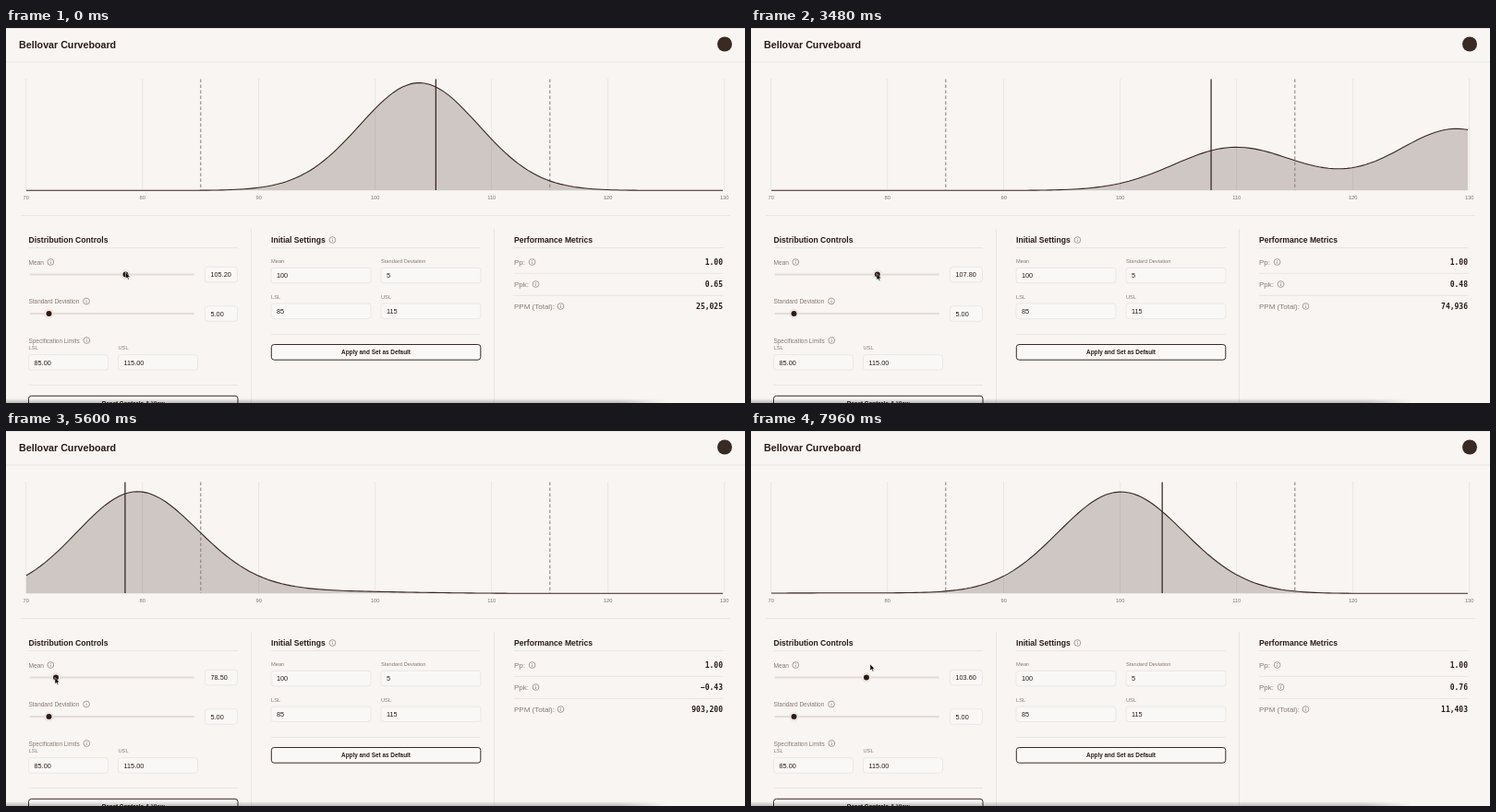
These frames come from a looping animation (800 px wide and 407 px high, 8000 ms). An HTML page:

```html
<!DOCTYPE html>
<html lang="en">
<head>
<meta charset="utf-8">
<title>Bellovar Curveboard</title>
<style>
  html, body { margin: 0; width: 100%; height: 100%; overflow: hidden; background: #f8f5f3; }
  svg { display: block; width: 100vw; height: 100vh; }
  text { font-family: "Liberation Sans", Arial, sans-serif; fill: #2a1a15; }
  .bold { font-weight: bold; }
  .muted { fill: #89796f; }
  .tick { fill: #7d746f; }
  .metric { font-family: "DejaVu Sans Mono", monospace; font-weight: bold; }
  .rule { stroke: #e9e5e2; }
  .grid { stroke: #eae6e3; }
  .limit { stroke: #867b76; stroke-dasharray: 3.5 2.5; }
  .field { fill: #faf8f6; stroke: #ebe7e4; }
  .button { fill: #faf8f6; stroke: #3a2a24; }
  .info { fill: none; stroke: #89796f; stroke-width: .7; }
</style>
</head>
<body>
<svg id="stage" viewBox="0 0 800 407" preserveAspectRatio="none"></svg>
<script>
const LOOP = 8000, STEP = 40;
const LSL = 85, USL = 115, SIGMA = 5;
const BASE = 176.3, PEAK = 119.3;
const LEFT = 22, RIGHT = 776, SCALE = 12.6;

// time, mean, pointer offset from the knob, pointer y
const KEYS = [
  [-400, 102.3, 0, 265], [0, 105.2, 0, 265], [500, 112.5, 0, 265], [840, 114.3, 0, 265],
  [1100, 115.7, 0, 265], [1200, 116.5, 0, 265], [1320, 119.5, 0, 264.5], [1680, 122.8, 0, 264],
  [1800, 129, 0, 264], [2200, 129.1, 0, 264], [3320, 129.1, 0, 265], [3360, 112, -.5, 266],
  [3600, 103.5, -1, 267], [4200, 101.2, -1, 268], [4360, 98.9, -1, 268.5], [4700, 88, -1, 268],
  [5000, 83, -1, 267.5], [5200, 80, -1, 267.5], [5600, 78.5, -1, 267.5], [6000, 73, 1, 266],
  [6350, 73.5, 3, 265], [6520, 77.4, 3.5, 265], [6800, 97, 4, 262], [7500, 98, 4, 257],
  [7800, 99.5, 4, 255], [7960, 103.6, 4, 253]
];

const chartX = value => LEFT + (value - 70) * SCALE;
const knobX = mean => 54 + (mean - 78.5) * 2.826;

function keyed(t, column) {
  if (t <= KEYS[0][0]) return KEYS[0][column];
  const next = KEYS.findIndex(key => key[0] >= t);
  if (next < 0) return KEYS[KEYS.length - 1][column];
  const a = KEYS[next - 1], b = KEYS[next];
  return a[column] + (b[column] - a[column]) * (t - a[0]) / (b[0] - a[0]);
}

const meanAt = t => Math.round(keyed(t, 1) * 10) / 10;

// Upper tail of the standard normal distribution, by its power series
function upperTail(z) {
  let term = z, sum = z;
  for (let n = 3; n < 400; n += 2) sum += term *= z * z / n;
  return .5 - sum * Math.exp(-z * z / 2) / Math.sqrt(2 * Math.PI);
}

// The curve trails the mean: every height eases exponentially to its new value.
function curvePath(t) {
  const lag = 260, dt = 10, segments = 150, history = [];
  let total = 0;
  for (let age = 0; age < 2000; age += dt) {
    const weight = Math.exp(-age / lag);
    history.push([meanAt(t - age), weight]);
    total += weight;
  }
  const points = [];
  for (let i = 0; i <= segments; i++) {
    const x = LEFT + (RIGHT - LEFT) * i / segments;
    const value = 70 + (x - LEFT) / SCALE;
    let height = 0;
    for (const [mean, weight] of history) {
      const z = (value - mean) / SIGMA;
      height += weight * Math.exp(-z * z / 2);
    }
    points.push(x.toFixed(1) + ' ' + (BASE - PEAK * height / total).toFixed(2));
  }
  return 'M' + points.join('L');
}

const text = (x, y, size, content, cls = '', extra = '') =>
  `<text x="${x}" y="${y}" font-size="${size}" class="${cls}" ${extra}>${content}</text>`;
const line = (x1, y1, x2, y2, cls = 'rule') =>
  `<line x1="${x1}" y1="${y1}" x2="${x2}" y2="${y2}" class="${cls}"/>`;
const box = (x, y, w, h, cls = 'field') =>
  `<rect x="${x}" y="${y}" width="${w}" height="${h}" rx="3" class="${cls}"/>`;
const info = (x, y) =>
  `<path class="info" d="M${x - 3.4} ${y}a3.4 3.4 0 1 0 6.8 0a3.4 3.4 0 1 0 -6.8 0M${x} ${y - .4}v2.2M${x} ${y - 1.9}v.8"/>`;
const field = (x, y, w, content, id = '') =>
  box(x, y, w, 16.5) + text(x + 6, y + 10.8, 7.3, content, '', id && `id="${id}"`);
const button = (x, y, label) =>
  box(x, y, 226.5, 16.7, 'button') + text(x + 113.2, y + 10.5, 6.4, label, 'bold', 'text-anchor="middle"');
const heading = (x, label) =>
  text(x, 233, 8.6, label, 'bold') + line(x, 238.5, x + 226.5, 238.5);
const track = y => `<rect x="25.5" y="${y - 1}" width="178.5" height="2" rx="1" fill="#e5dbd5"/>`;
const knob = (x, y, id) =>
  `<g id="${id}" transform="translate(${x} ${y})"><circle r="4.7" fill="#f8f1ed" stroke="#e5d8d1" stroke-width=".8"/><circle r="3" fill="#2a1a15"/></g>`;
const metric = (y, label, iconX, id, content = '') =>
  text(550, y, 8, label, 'muted') + info(iconX, y - 3) +
  text(776, y, 8, content, 'metric', `id="${id}" text-anchor="end"`);

const ticks = [70, 80, 90, 100, 110, 120, 130];

document.getElementById('stage').innerHTML = `
  <defs>
    <linearGradient id="shade" x1="0" y1="0" x2="0" y2="1">
      <stop offset="0" stop-color="#000" stop-opacity="0"/>
      <stop offset="1" stop-color="#000" stop-opacity=".24"/>
    </linearGradient>
    <linearGradient id="fade">
      <stop offset=".93" stop-color="#fff"/><stop offset="1" stop-color="#000"/>
    </linearGradient>
    <mask id="shadeMask"><rect y="400" width="715" height="7" fill="url(#fade)"/></mask>
  </defs>
  <rect width="800" height="407" fill="#f8f5f3"/>
  ${line(0, .5, 800, .5)}
  ${text(14, 21.7, 10.7, 'Bellovar Curveboard', 'bold')}
  <circle cx="778" cy="17.5" r="8" fill="#3a2a24"/>
  ${line(0, 37, 800, 37)}

  ${ticks.map(v => line(chartX(v) - .3, 55, chartX(v) - .3, 176, 'grid') +
    text(chartX(v) - .3, 186, 5.7, v, 'tick', 'text-anchor="middle"')).join('')}
  <path id="area" fill="#36200f" fill-opacity=".21"/>
  ${[LSL, USL].map(v => line(chartX(v) - .2, 55.5, chartX(v) - .2, 176, 'limit')).join('')}
  <path id="curve" fill="none" stroke="#3a2620" stroke-width="1.1"/>
  <line id="meanLine" y1="55.5" y2="176" stroke="#2f1f1a" stroke-width="1.2"/>
  ${line(16, 203.5, 784, 203.5)}
  ${line(265.5, 218, 265.5, 407)}${line(528.5, 218, 528.5, 407)}

  ${heading(24.5, 'Distribution Controls')}
  ${text(24.5, 256.5, 6.6, 'Mean', 'muted')}${info(48.3, 254)}
  ${track(267.5)}${field(215.5, 259.3, 35, '', 'meanValue')}
  ${text(24.5, 299, 6.45, 'Standard Deviation', 'muted')}${info(87, 296.5)}
  ${track(310)}${field(215.5, 301.8, 35, '5.00')}
  ${knob(46.5, 310, 'sdKnob')}
  ${text(24.5, 341.7, 6.45, 'Specification Limits', 'muted')}${info(87.3, 339)}
  ${text(24.5, 349, 5.7, 'LSL', 'muted')}${text(121.5, 349, 5.7, 'USL', 'muted')}
  ${field(24.5, 354.7, 86, '85.00')}${field(121.5, 354.7, 86, '115.00')}
  ${line(24.5, 387.5, 251, 387.5)}
  ${button(24.5, 399.3, 'Reset Controls &amp; View')}

  ${heading(287, 'Initial Settings')}${info(353.4, 230)}
  ${text(287, 255, 5.7, 'Mean', 'muted')}${text(406, 255, 5.7, 'Standard Deviation', 'muted')}
  ${field(287, 260.3, 108, '100')}${field(406, 260.3, 108, '5')}
  ${text(287, 293.7, 5.7, 'LSL', 'muted')}${text(406, 293.7, 5.7, 'USL', 'muted')}
  ${field(287, 299, 108, '85')}${field(406, 299, 108, '115')}
  ${line(287, 332.5, 513.5, 332.5)}
  ${button(287.3, 343.5, 'Apply and Set as Default')}

  ${heading(550, 'Performance Metrics')}
  ${metric(257, 'Pp:', 569.6, 'pp', '1.00')}
  ${line(550, 266.3, 776.5, 266.3)}
  ${metric(281, 'Ppk:', 573.5, 'ppk')}
  ${line(550, 290.3, 776.5, 290.3)}
  ${metric(305, 'PPM (Total):', 600.5, 'ppm')}

  <rect y="402" width="715" height="5" fill="url(#shade)" mask="url(#shadeMask)"/>
  ${knob(0, 267.5, 'meanKnob')}
  <path id="pointer" d="M0 0V7L1.6 5.6L2.7 8L3.8 7.5L2.8 5.2H5Z" fill="#000" stroke="#fff" stroke-width=".5"/>`;

const el = id => document.getElementById(id);
const place = (id, x, y) => el(id).setAttribute('transform', `translate(${x.toFixed(2)} ${y.toFixed(2)})`);

function render(t) {
  const mean = meanAt(t);
  const path = curvePath(t);
  el('curve').setAttribute('d', path);
  el('area').setAttribute('d', `${path}L${RIGHT} ${BASE}L${LEFT} ${BASE}Z`);
  el('meanLine').setAttribute('x1', chartX(mean) - .2);
  el('meanLine').setAttribute('x2', chartX(mean) - .2);
  place('meanKnob', knobX(mean), 267.5);
  place('pointer', knobX(mean) + keyed(t, 2), keyed(t, 3));

  el('meanValue').textContent = mean.toFixed(2);
  const ppk = Math.min(USL - mean, mean - LSL) / (3 * SIGMA);
  el('ppk').textContent = ppk.toFixed(2).replace('-', '\u2212');
  const defects = upperTail((USL - mean) / SIGMA) + upperTail((mean - LSL) / SIGMA);
  el('ppm').textContent = Math.round(defects * 1e6).toLocaleString('en-US');
}

const start = performance.now();
function tick() {
  const t = (performance.now() - start) % LOOP;
  render(Math.floor(t / STEP) * STEP);
  requestAnimationFrame(tick);
}
tick();
</script>
</body>
</html>
```
